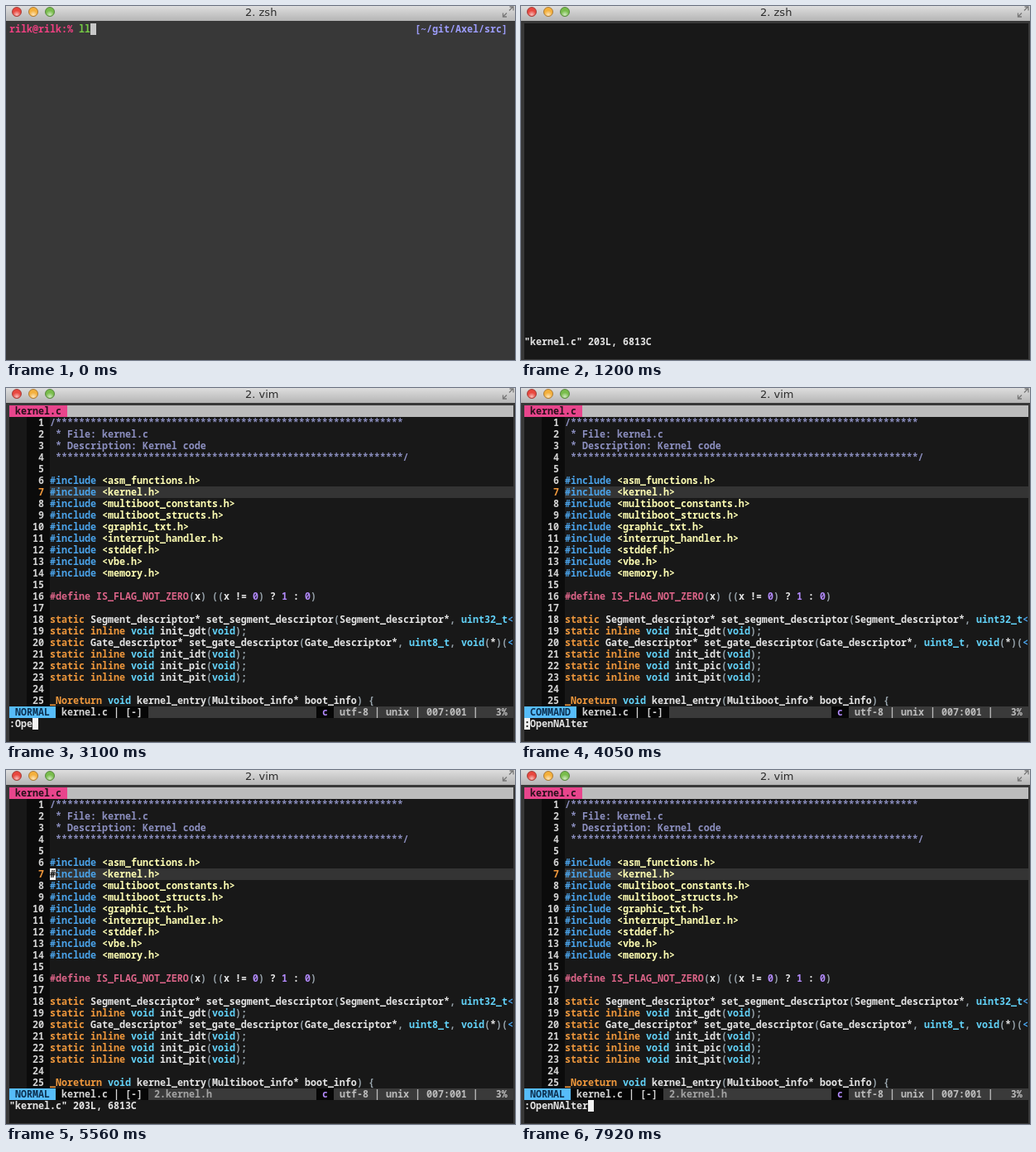
Recreate the animation shown at these times as an HTML page. Size 615 by 428 pixels, loop 8000 ms.

```html
<!DOCTYPE html>
<html lang="en">
<head>
<meta charset="utf-8">
<title>Terminal</title>
<style>
html, body { margin: 0; width: 100%; height: 100%; overflow: hidden; background: #383838; }
#bar {
  position: absolute; left: 0; top: 0; width: 615px; height: 18px;
  background: linear-gradient(#dedede, #b5b5b5);
}
#bar svg { position: absolute; left: 0; top: 0; }
#title {
  position: absolute; left: 289px; top: 0; color: #2c2c2c; white-space: pre;
  font: 13px/15px "DejaVu Sans", sans-serif;
}
#term span {
  position: absolute; height: 14px; white-space: pre; overflow: hidden;
  font: 600 11.6667px/13px "Noto Sans Mono", "Liberation Mono", monospace;
}
#term .wide { font: 600 14px/13px "Noto Sans CJK JP", "Noto Sans CJK", sans-serif; }
#term .path { text-decoration: underline; }
</style>
</head>
<body>
<div id="bar">
  <svg width="615" height="18">
    <defs>
      <radialGradient id="shine" cy=".85">
        <stop offset="0" stop-color="#fff" stop-opacity=".65"/>
        <stop offset="1" stop-color="#fff" stop-opacity="0"/>
      </radialGradient>
    </defs>
    <g stroke-opacity=".75">
      <circle cx="13" cy="7" r="5.5" fill="#e8483f" stroke="#8e2a25"/>
      <circle cx="33" cy="7" r="5.5" fill="#f4b03c" stroke="#966322"/>
      <circle cx="53" cy="7" r="5.5" fill="#79bd4c" stroke="#41702a"/>
    </g>
    <g fill="url(#shine)">
      <circle cx="13" cy="7" r="5"/><circle cx="33" cy="7" r="5"/><circle cx="53" cy="7" r="5"/>
    </g>
    <path d="M608 5.500l4-4M608.500 1h4.500v4.500M605 8.500l-4 4M600.500 8.500v4.500h4.500"
      fill="none" stroke="#777" stroke-width="1.300"/>
  </svg>
  <div id="title"></div>
</div>
<div id="term"></div>
<script>
const term = document.getElementById('term');
const title = document.getElementById('title');
const WHITE = '#e4e4e4', DARK = '#181818', BLACK = '#060606', GRAY = '#3a3a3a';
const COLS = 87, CODE = 7;
const colors = {
  comment: '#8c8fc0', include: '#4aa3ea', string: '#ffffb4', define: '#dc6488',
  guard: '#8cf03c', storage: '#f0983c', type: '#62d2f8', struct: '#6cc4f0',
  builtin: '#8cf03c', number: '#b088f8', punct: '#98a4ac', fold: '#6490b8'
};
const syntax = new RegExp([
  '(?<comment>^ ?/?\\*.*)', '(?<include>#include)', '(?<string><[\\w.]+>|"[^"]*)',
  '(?<define>#define \\w+)', '(?<guard>#ifndef \\w+)',
  '(?<storage>\\b(?:static|inline|_Noreturn)\\b)', '(?<type>\\b(?:void|uint\\d+_t)\\b)',
  '(?<struct>\\b(?:struct|typedef|enum)\\b)', '(?<builtin>_Static_assert|sizeof)',
  '(?<number>\\b\\d+\\b)', '(?<punct>[(){};,]+)'
].join('|'), 'g');

const stars = '*'.repeat(60);
const number = (first, lines) => lines.map((text, i) => [first + i, text]);
const files = {
  source: {
    tab: 'kernel.c', name: 'kernel.c', line: 7, percent: '3%',
    message: '"kernel.c" 203L, 6813C',
    lines: number(1, [
      '/' + stars, ' * File: kernel.c', ' * Description: Kernel code', ' ' + stars + '/', '',
      ...['asm_functions', 'kernel', 'multiboot_constants', 'multiboot_structs', 'graphic_txt',
        'interrupt_handler', 'stddef', 'vbe', 'memory'].map(h => `#include <${h}.h>`),
      '', '#define IS_FLAG_NOT_ZERO(x) ((x != 0) ? 1 : 0)', '',
      'static Segment_descriptor* set_segment_descriptor(Segment_descriptor*, uint32_t',
      'static inline void init_gdt(void);',
      'static Gate_descriptor* set_gate_descriptor(Gate_descriptor*, uint8_t, void(*)(',
      ...['idt', 'pic', 'pit'].map(n => `static inline void init_${n}(void);`),
      '', '_Noreturn void kernel_entry(Multiboot_info* boot_info) {'
    ])
  },
  header: {
    tab: './i/kernel.h', name: 'kernel.h', line: 1, percent: '0%',
    message: '"./include/kernel.h" 192L, 6591C',
    lines: [
      ...number(1, [
        '/' + stars, ' * File: include/kernel.h', ' * Description: kernel header',
        ' ' + stars + '/', '', '/* TODO: Add comment */', '', '#ifndef KERNEL_H',
        '#define KERNEL_H', '', '#include <stdint.h>', '',
        '/* Global Segment Descriptor Table */', 'struct segment_descriptor {'
      ]),
      [15, ['//', 'セグメントのサイズ', '', 28]],
      ...number(43, [
        '};', 'typedef struct segment_descriptor Segment_descriptor;',
        '_Static_assert(sizeof(Segment_descriptor) == 8, "Static ERROR : Segment_descrip',
        '', 'enum GDT_constants {'
      ]),
      [48, ['/*', '設定先アドレス', '*/', 44]],
      ...number(92, ['};', '', '', '/* Interrupt Gate Descriptor Table */'])
    ]
  }
};

function box(x, y, w, h, bg) {
  const el = document.createElement('span');
  el.style.cssText = `left:${x}px;top:${y}px;width:${w}px;height:${h}px;background:${bg}`;
  return term.appendChild(el);
}

function put(row, col, text, color = WHITE, bg = 'transparent', cls = '') {
  const width = text.length * (cls === 'wide' ? 14 : 7);
  const el = box(4 + col * 7, 21 + row * 14, width, 14, bg);
  el.textContent = text;
  el.style.color = color;
  el.className = cls;
}

const fill = (row, col, n, bg) => put(row, col, ' '.repeat(n), WHITE, bg);
const cursor = (row, col, char = ' ') => put(row, col, char, '#111', '#f2f2f2');

function drawCode(row, text) {
  let end = 0;
  for (const m of text.matchAll(syntax)) {
    if (m.index > end) put(row, CODE + end, text.slice(end, m.index));
    const kind = Object.keys(m.groups).find(k => m.groups[k]);
    put(row, CODE + m.index, m[0], colors[kind]);
    end = m.index + m[0].length;
  }
  if (end < text.length) put(row, CODE + end, text.slice(end));
  if (text.length === 79) put(row, COLS - 1, '<', colors.include);
  const todo = text.indexOf('TODO');
  if (todo >= 0) put(row, CODE + todo, 'TODO', '#fff', '#000');
}

function drawFold(row, [open, label, close, count]) {
  const blue = colors.fold;
  fill(row, CODE, COLS - CODE, BLACK);
  put(row, 0, '+', blue);
  put(row, CODE, '+-- ' + open, blue);
  put(row, CODE + 7, label, blue, 'transparent', 'wide');
  put(row, CODE + 8 + label.length * 2, close, blue);
  put(row, CODE + 57, `[ ${count} Lines Lv01 ] --- -`, blue);
}

function drawStatus(file, mode, other) {
  const row = 26, head = ` ${mode} `, name = ` ${file.name} | [-] `;
  fill(row, 0, COLS, GRAY);
  put(row, 0, head, '#0c3050', '#56bcfa');
  put(row, head.length, name, '#d4d4d4', BLACK);
  put(row, head.length + name.length + 1, other, '#a4a4a4');
  put(row, 53, ' c ', colors.number, BLACK);
  put(row, 57, `utf-8 | unix | 00${file.line}:001 |   ${file.percent}`, '#bcbcbc');
}

function drawShell(s) {
  put(0, 0, 'rilk@rilk:%', '#ee4080');
  const [command, path = ''] = s.typed.split(' ');
  put(0, 12, command, '#74c844');
  if (path) put(0, 13 + command.length, path, WHITE, 'transparent', 'path');
  if (s.running) return put(1, 0, ' ', WHITE, '#c8c8c8');
  put(0, 12 + s.typed.length, ' ', WHITE, '#c8c8c8');
  put(0, 70, '[~/git/Axel/src]', '#9c9cfa');
}

function drawVim(s) {
  box(4, 21, 609, 406, DARK);
  put(27, 0, s.cmd);
  if (!s.file) return;
  const file = files[s.file];
  fill(0, 0, COLS, '#bcbcbc');
  put(0, 0, ` ${file.tab} `, '#26101a', '#e8458c');
  box(25, 35, 28, 350, '#0b0b0b');
  file.lines.forEach(([num, text], i) => {
    const row = i + 1, current = num === file.line, folded = Array.isArray(text);
    if (current) fill(row, CODE, COLS - CODE, '#343434');
    put(row, 3, String(num).padStart(3),
      current ? colors.storage : folded ? colors.fold : '#d4d4d4');
    (folded ? drawFold : drawCode)(row, text);
  });
  drawStatus(file, s.mode, s.other);
  if (s.at === 'code') cursor(file.line, CODE, file.lines[file.line - 1][1][0]);
  if (s.at === 'end') cursor(27, s.cmd.length);
  if (s.at === 'start') cursor(27, 0, s.cmd[0]);
}

// Each entry changes part of the state at its time in ms.
const { source, header } = files;
const events = [
  [0, { title: '2. zsh', typed: 'll', mode: 'NORMAL', other: '' }],
  [300, { typed: 'vim kernel.c' }],
  [960, { running: true }],
  [1200, { vim: true, cmd: source.message }],
  [1260, { file: 'source', at: 'code' }],
  [1860, { title: '2. vim' }],
  [2150, { cmd: '', at: '' }],
  [2210, { cmd: ':', at: 'end' }],
  [2750, { cmd: ':O' }],
  [2990, { cmd: ':Op' }],
  [3100, { cmd: ':Ope' }],
  [3340, { cmd: ':OpenNAlter' }],
  [3390, { mode: 'COMMAND', at: 'start' }],
  [4100, { cmd: header.message, at: '' }],
  [4190, { file: 'header', mode: 'NORMAL', other: '1.kernel.c' }],
  [4280, { at: 'code' }],
  [5120, { at: '' }],
  [5200, { at: 'code' }],
  [5500, { file: 'source', other: '2.kernel.h', cmd: source.message, at: '' }],
  [5560, { at: 'code' }],
  [6400, { cmd: ':', at: 'end' }],
  [6960, { cmd: ':OpenNAlter' }],
  [7560, { at: '' }],
  [7920, { at: 'end' }]
];

let shown = 0;
function tick() {
  const t = performance.now() % 8000;
  const past = events.filter(([time]) => time <= t);
  if (past.length !== shown) {
    shown = past.length;
    const state = Object.assign({}, ...past.map(e => e[1]));
    title.textContent = state.title;
    term.replaceChildren();
    (state.vim ? drawVim : drawShell)(state);
  }
  requestAnimationFrame(tick);
}
tick();
</script>
</body>
</html>
```
